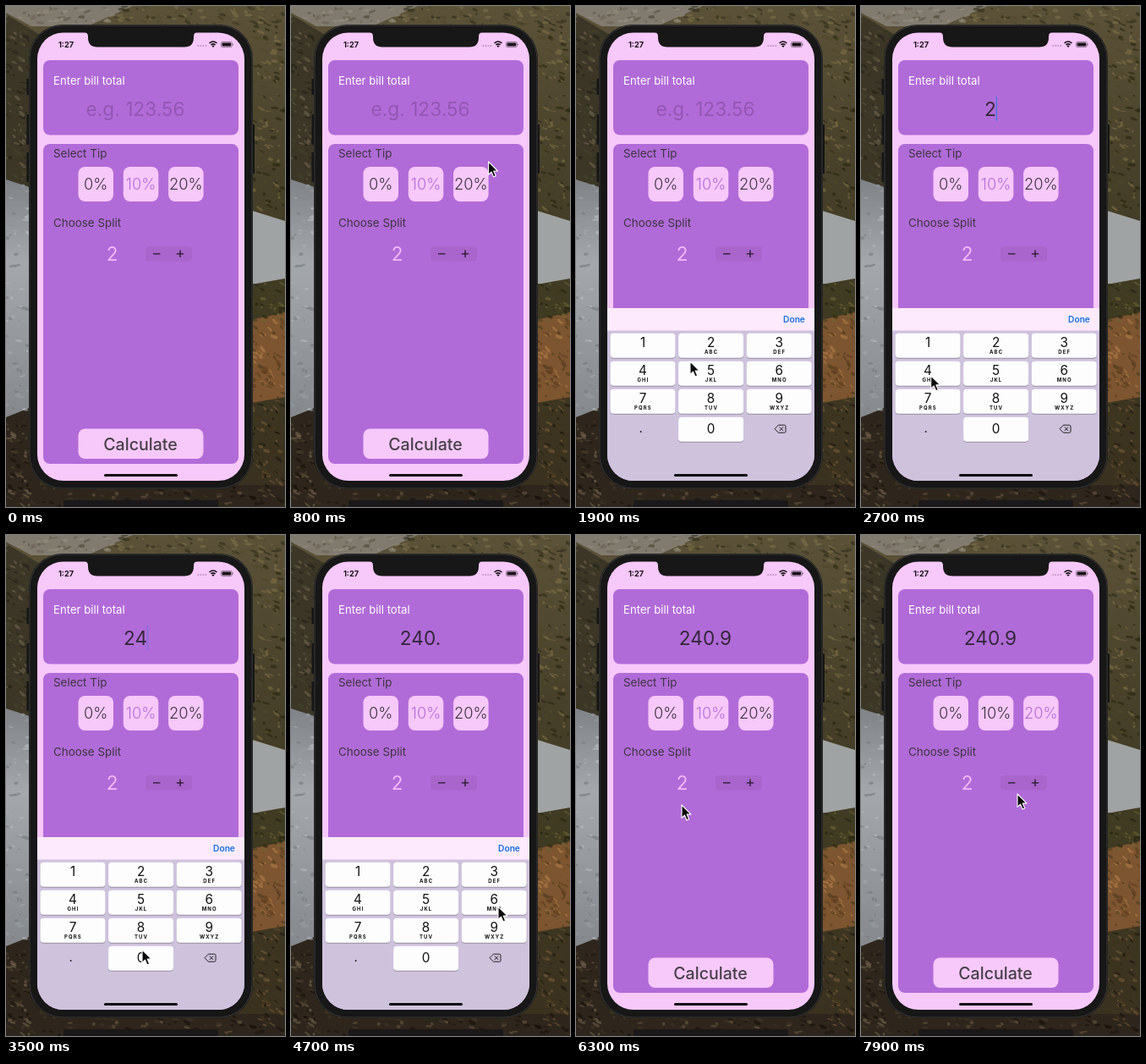
An HTML page that plays this animation: 330x592 px, repeating every 8000 ms.

```html
<!DOCTYPE html>
<html lang="en">
<head>
<meta charset="utf-8">
<title>Tip calculator</title>
<style>
  html, body { margin: 0; width: 100%; height: 100%; overflow: hidden; background: #3a3325; }
  svg { display: block; width: 330px; height: 592px; }
  text { font-family: Inter, Roboto, sans-serif; white-space: pre; }
</style>
</head>
<body>
<svg id="stage" viewBox="0 0 330 592" xmlns="http://www.w3.org/2000/svg">
  <defs>
    <clipPath id="glass"><rect x="37" y="31.5" width="245" height="529.5" rx="31"/></clipPath>
    <linearGradient id="sea" x2="0" y2="1">
      <stop offset="0" stop-color="#7f8387"/><stop offset=".35" stop-color="#a4a8ad"/><stop offset="1" stop-color="#85898d"/>
    </linearGradient>
    <linearGradient id="hill" x2="0" y2="1">
      <stop offset="0" stop-color="#5b5238"/><stop offset=".35" stop-color="#463f29"/>
      <stop offset=".6" stop-color="#3f3a22"/><stop offset="1" stop-color="#39301f"/>
    </linearGradient>
  </defs>

  <g id="scenery">
    <rect width="330" height="592" fill="url(#hill)"/>
    <path d="M0 0H150L96 24H30L0 8Z" fill="#817b6f"/>
    <path d="M0 10L40 34V215H0Z" fill="#3b3626"/>
    <path d="M0 205L40 218V480L0 486Z" fill="url(#sea)"/>
    <path d="M285 240L330 254V322L285 330Z" fill="#a0a3a3"/>
    <path d="M285 372L330 362V462L285 470Z" fill="#7d5530"/>
    <path d="M0 486L40 470V566H330V592H0Z" fill="#2e261c"/>
  </g>
  <g id="specks"></g>

  <g id="phone">
    <path d="M24.5 86h4v19h-4zM24.5 128h4v36h-4zM24.5 173h4v35h-4zM290 140h4v58h-4z" fill="#161616"/>
    <rect x="27" y="22" width="265" height="549" rx="40" fill="#171717"/>
    <rect x="28" y="23" width="263" height="547" rx="39" fill="none" stroke="#3a3939"/>
    <rect x="68" y="584" width="183" height="12" rx="2" fill="#1a1819"/>
    <rect x="37" y="31.5" width="245" height="529.5" rx="31" fill="#f7c8fa"/>
    <path d="M92 31Q97 31 97 36V37Q97 48.5 108 48.5H211Q222 48.5 222 37V36Q222 31 227 31Z" fill="#171717"/>
  </g>

  <g id="status" fill="#171117">
    <g fill="#bd94c2">
      <circle cx="227.3" cy="47" r="1"/><circle cx="230.3" cy="47" r="1"/>
      <circle cx="233.3" cy="47" r="1"/><circle cx="236.3" cy="47" r="1"/>
    </g>
    <path d="M240.5 44Q245 40 249.5 44M242.4 46Q245 43.8 247.6 46" fill="none" stroke="#171117" stroke-width="1.5"/>
    <path d="M243.4 47.2Q245 46 246.6 47.2L245 49Z"/>
    <rect x="254.4" y="42.4" width="13" height="6.2" rx="1.8" fill="none" stroke="#7d647f" stroke-width=".8"/>
    <rect x="255.5" y="43.5" width="10.8" height="4" rx=".9"/>
    <path d="M268.3 44.3q1.2 1.2 0 2.4z"/>
  </g>

  <g id="app"></g>
  <g clip-path="url(#glass)"><g id="keyboard"></g></g>
  <rect x="116" y="553" width="87" height="3" rx="1.5" fill="#0b090b"/>
  <path id="pointer" d="M0 0V15.4L3.5 12.1L6 18L8.7 16.8L6.2 11.1H11Z" fill="#0a0a0a" stroke="#fff" stroke-width="1.1" stroke-linejoin="round"/>
</svg>

<script>
const LOOP = 8000, STEP = 100, MID = 153;
const PURPLE = '#b16bd8', PINK = '#f7c8fa', INK = '#3d3540';
const $ = id => document.getElementById(id);

function add(parent, tag, attrs, content) {
  const el = document.createElementNS('http://www.w3.org/2000/svg', tag);
  for (const k in attrs) el.setAttribute(k, attrs[k]);
  if (content) el.textContent = content;
  parent.appendChild(el);
  return el;
}
const box = (parent, x, y, width, height, rx, fill) =>
  add(parent, 'rect', { x, y, width, height, rx, fill });
// cy is the middle of the capital letters
const label = (parent, s, x, cy, size, fill, more = {}) =>
  add(parent, 'text', { x, y: cy + size * 0.364, 'font-size': size, fill, 'text-anchor': 'middle', ...more }, s);

// Scrub, stones and ripples
let seed = 7;
const rnd = () => (seed = seed * 16807 % 2147483647) / 2147483647;
function scatter(x, y, w, h, n, colours, slope) {
  for (let i = 0; i < n; i++) {
    const cx = x + rnd() * w, cy = y + rnd() * h;
    add($('specks'), 'ellipse', {
      cx, cy, rx: 1 + rnd() * 4, ry: 0.6 + rnd() * 1.6, fill: colours[i % colours.length],
      opacity: 0.6, transform: `rotate(${slope + rnd() * 40 - 20} ${cx} ${cy})`
    });
  }
}
scatter(0, 0, 130, 20, 40, ['#6a6353', '#9a9383', '#57503f'], -10);
scatter(130, 0, 200, 22, 80, ['#2f2d1b', '#7b6f4a', '#51492f'], 15);
scatter(0, 30, 28, 178, 90, ['#211f15', '#71664d', '#45422b'], 30);
scatter(0, 212, 28, 268, 60, ['#b8bcc1', '#74797e', '#979ca1'], 0);
scatter(0, 488, 28, 104, 60, ['#16110c', '#75644d', '#4b3d2b'], 20);
scatter(290, 20, 40, 222, 130, ['#26240f', '#7e7045', '#4d4728'], 25);
scatter(290, 328, 40, 44, 40, ['#21210f', '#6c6436', '#45431f'], 20);
scatter(290, 372, 40, 92, 60, ['#5a3a1e', '#b07d47', '#46391d'], 40);
scatter(290, 466, 40, 126, 90, ['#19140d', '#775a38', '#44381f'], 30);
scatter(28, 568, 264, 24, 70, ['#17110c', '#69563f', '#43362a'], 10);

// App screen
const app = $('app');
const left = { 'text-anchor': 'start' };
label($('status'), '1:27', 71, 45.3, 9.2, '#171117', { 'font-weight': 700 });
box(app, 44, 64, 231, 88.5, 8, PURPLE);
box(app, 44, 163, 231, 378, 8, PURPLE);
label(app, 'Enter bill total', 56, 88, 13.2, '#fff', left);
label(app, 'Select Tip', 56, 174, 13.4, INK, left);
label(app, 'Choose Split', 56, 256.6, 13.4, INK, left);

const field = label(app, '', MID, 121.7, 22.7, INK);
const caret = box(app, 0, 107, 1.4, 29, 0.7, '#4a7be0');

const tips = ['0%', '10%', '20%'].map((s, i) => {
  const x = 85.5 + i * 53.3;
  box(app, x, 190, 41.5, 41, 8, PINK);
  return label(app, s, x + 20.7, 210.8, 18.3, INK, { 'font-weight': 300 });
});

label(app, '2', 125.7, 292.8, 22.5, '#f3b9f8');
box(app, 165, 284, 55, 17.5, 4, '#a965cb');
add(app, 'path', { d: 'M174 292.8h8.4M201.8 292.8h8.4M206 288.6v8.4', stroke: '#221727', 'stroke-width': 1.3 });
box(app, 85.5, 499.5, 148, 35.5, 8, PINK);
label(app, 'Calculate', 159, 517.6, 19.6, '#454047', { 'font-weight': 500 });

// Keyboard, drawn in its raised place
const board = $('keyboard');
box(board, 37, 357, 245, 27, 0, '#fdeafd');
box(board, 37, 383.5, 245, 180, 0, '#cfc2dd');
label(board, 'Done', 258, 370.2, 10.2, '#1570dc', { 'font-weight': 600 });
const keys = ['1', '2ABC', '3DEF', '4GHI', '5JKL', '6MNO', '7PQRS', '8TUV', '9WXYZ', '.', '0', ''];
keys.forEach((key, i) => {
  const x = 40.5 + i % 3 * 80.6, row = Math.floor(i / 3), y = 386.7 + row * 33, mid = x + 38.5;
  if (row < 3 || key === '0') {
    box(board, x, y + 1, 77, 29, 4, '#978da3');
    box(board, x, y, 77, 29, 4, '#fefdfe');
  }
  if (key === '.') label(board, '.', 76.7, 499, 15, '#111');
  else if (key) label(board, key[0], mid, row < 3 ? y + 10.3 : y + 13.3, 15.3, '#111');
  if (key.length > 1)
    label(board, key.slice(1), mid + 0.5, y + 22.2, 6, '#111', { 'font-weight': 700, 'letter-spacing': 1.1 });
});
add(board, 'path', {
  d: 'M235 499.7L239.4 495.2H246.5Q248 495.2 248 496.7V502.7Q248 504.2 246.5 504.2H239.4ZM240.7 497.4L245.2 502M245.2 497.4L240.7 502',
  fill: 'none', stroke: '#222', 'stroke-width': 1, 'stroke-linejoin': 'round'
});

// Timing
const typed = [[0, ''], [2300, '2'], [2900, '24'], [3600, '240'], [4000, '240.'], [5100, '240.9']];
const FOCUS = 1100, BLUR = 5600, PICK = 7200, SLIDE = 505;
const path = [
  // ms, x, y
  [500, 334, 250], [1000, 179, 148], [1300, 179, 148], [1900, 135, 420], [2150, 158, 402],
  [2300, 158, 402], [2750, 80, 438], [2900, 80, 438], [3400, 161, 490], [3600, 161, 490],
  [3850, 77, 500], [4100, 77, 500], [4700, 245, 439], [4900, 242, 468], [5150, 242, 468],
  [5450, 258, 371], [5650, 258, 371], [6300, 125, 319], [6500, 125, 319], [7000, 213, 213],
  [7400, 213, 213], [7900, 185, 306]
];
const clamp = v => Math.max(0, Math.min(1, v));
const easeOut = p => 1 - (1 - clamp(p)) ** 3;
const smooth = p => p * p * (3 - 2 * p);

function pointerAt(t) {
  const i = path.findIndex(p => p[0] > t);
  if (i === 0) return null;
  if (i < 0) return path[path.length - 1].slice(1);
  const a = path[i - 1], b = path[i], k = smooth((t - a[0]) / (b[0] - a[0]));
  return [a[1] + (b[1] - a[1]) * k, a[2] + (b[2] - a[2]) * k];
}

// Solid for half a second, then fades out and back
function caretAlpha(age) {
  const a = age % 1000;
  return a < 500 ? 1 : a < 700 ? 1 - (a - 500) / 200 : a < 850 ? 0 : (a - 850) / 150;
}

function draw(t) {
  const [since, value] = typed.filter(e => e[0] <= t).pop();
  field.textContent = value || 'e.g. 123.56';
  field.setAttribute('fill', value ? '#33283a' : '#9257b2');

  const focused = t >= FOCUS && t < BLUR;
  const half = field.getComputedTextLength() / 2;
  caret.setAttribute('x', value ? MID + half - 0.3 : MID - half - 0.3);
  caret.setAttribute('opacity', focused ? caretAlpha(t - Math.max(since, FOCUS)) : 0);

  const raised = easeOut((t - FOCUS) / SLIDE) - easeOut((t - BLUR) / SLIDE);
  board.setAttribute('transform', `translate(0 ${(1 - raised) * 204})`);
  board.setAttribute('visibility', raised > 0 ? 'visible' : 'hidden');

  const chosen = t < PICK ? 1 : 2;
  tips.forEach((tip, i) => tip.setAttribute('fill', i === chosen ? '#b56fd8' : INK));

  const at = pointerAt(t);
  $('pointer').setAttribute('visibility', at ? 'visible' : 'hidden');
  if (at) $('pointer').setAttribute('transform', `translate(${at[0]} ${at[1]})`);
}

const start = performance.now();
function tick() {
  const t = (performance.now() - start) % LOOP;
  draw(Math.floor(t / STEP) * STEP);
  requestAnimationFrame(tick);
}
tick();
</script>
</body>
</html>
```
